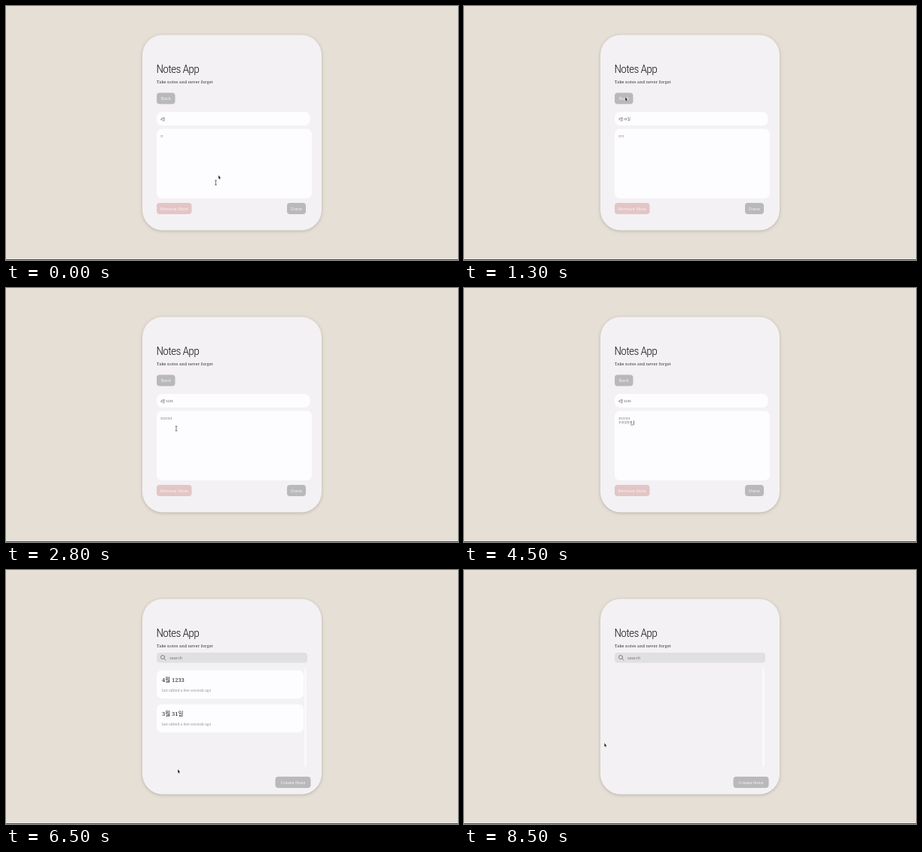
An HTML page that plays this animation: 600 px wide and 338 px high, repeating every 9.4 s.

```html
<!DOCTYPE html>
<html lang="en">
<head>
<meta charset="utf-8">
<title>Notes App</title>
<style>
  html, body { margin: 0; width: 100%; height: 100%; overflow: hidden; background: #e6dfd5; }
  svg { display: block; width: 600px; height: 338px; }
  text { font-family: "Noto Sans", sans-serif; white-space: pre; }
  .heading { font: 300 15.5px "Roboto Condensed", Roboto, sans-serif; font-stretch: 75%; letter-spacing: -.7px; fill: #151515; }
  .serif { font-family: "Noto Serif", "Noto Sans CJK KR", "Noto Sans CJK", serif; }
  .tagline { font-size: 5.4px; letter-spacing: .12px; fill: #333; }
  .card-title { font-size: 7.5px; fill: #161616; }
  .edited { font-size: 4.75px; fill: #999; }
  .field { font-size: 4.2px; fill: #444; }
  .body { font-size: 4px; fill: #666; }
  .search { font-size: 5.6px; fill: #77767a; }
  .button { font-size: 5.9px; fill: #f4f3f5; text-anchor: middle; }
  .panel { filter: drop-shadow(0 1px 2px rgba(70, 60, 50, .28)); }
</style>
</head>
<body>
<svg viewBox="0 0 600 338">
  <rect width="600" height="338" fill="#e6dfd5"/>
  <rect y="336" width="600" height="1" fill="#efece4"/>
  <rect y="337" width="600" height="1" fill="#4b4a45"/>
  <rect class="panel" x="181" y="38.5" width="238" height="260" rx="27" fill="#f3f1f4"/>
  <text class="heading" x="199.5" y="89">Notes App</text>
  <text class="serif tagline" x="200" y="102.6">Take notes and never forget</text>

  <g id="list">
    <rect x="200" y="110" width="200" height="13.5" rx="4" fill="#e0dfe2"/>
    <g fill="none" stroke="#77767a" stroke-width=".9" stroke-linecap="round">
      <circle cx="208" cy="116" r="2.5"/><path d="M209.9 117.9l2 2"/>
    </g>
    <text class="search" x="217" y="118.7">search</text>
    <rect x="396" y="131" width="3" height="131" fill="#f9f8fa"/>
    <rect id="thumb" x="396.5" y="135" width="2.5" height="117" rx="1.2" fill="#9d9c9f"/>
    <g id="cards"></g>
  </g>

  <g id="editor">
    <rect x="200" y="141" width="203.5" height="18" rx="7" fill="#fdfcfe"/>
    <rect x="200" y="163.5" width="206" height="92.5" rx="7" fill="#fdfcfe"/>
    <text id="title" class="serif field" x="205" y="152.2"></text>
    <text id="body" class="serif body" x="205" y="174.8"></text>
    <text id="typed" class="serif body" x="205" y="181"></text>
    <rect id="underline" y="181.8" width="4" height=".6" fill="#444"/>
    <rect id="caret" y="176.5" width=".6" height="5.5" fill="#222"/>
  </g>

  <g id="beam" fill="none" stroke="#444" stroke-width=".7">
    <path d="M-1.4 -3H1.4M-1.4 3H1.4M0 -3V3"/>
  </g>
  <path id="arrow" d="M0 -3V2.2L1 1.3 1.8 3 2.6 2.6 1.9 1H3.2Z" fill="#111" stroke="#fff" stroke-width=".3"/>
  <use id="ghost" href="#beam-shape"/>
</svg>
<script>
const LOOP = 9400, STEP = 100;
const TYPED = "우이앙아애앙";
const NOTES = {
  draft: ["4월", "ㅁ"],
  first: ["2021.3월.1", "ㅁㅁㄴ ㅁㅁㅁㅁㄴㅁㅁ"],
  second: ["4월 1233", "3321321"],
  third: ["3월 31일", "ㅁㅁ"]
};
const ORDER = ["first", "second", "third"];

// [start, open note or null for the list, notes already removed]
const VIEWS = [
  [0, "draft", 0], [400, null, 0], [900, "third", 0], [1400, null, 0],
  [1800, "second", 0], [2300, null, 0], [2800, "second", 0], [4900, null, 0],
  [5500, "first", 0], [6500, null, 1], [7000, "second", 1], [7500, null, 2],
  [7700, "third", 2], [7900, null, 3]
];

// [time, x, y, shape from here on]
const POINTER = [
  [0, 282, 228, "arrow"], [100, 282, 228, "arrow"], [300, 230, 266, "arrow"],
  [600, 230, 266, "arrow"], [800, 238, 252, "beam"], [1000, 238, 235, "beam"],
  [1300, 214, 124, "arrow"], [1400, 214, 124, "arrow"], [1600, 241, 205, "beam"],
  [1700, 241, 205, "beam"], [1800, 241, 211, "beam"], [1900, 241, 211, "beam"],
  [2200, 214, 124, "arrow"], [2400, 214, 124, "arrow"], [2700, 226, 187, "beam"],
  [2900, 226, 187, "beam"], [3200, 245, 170, "beam"], [3400, 245, 170, "none"],
  [4600, 245, 175, "beam"], [4800, 375, 275, "arrow"], [5000, 375, 275, "arrow"],
  [5400, 330, 142, "beam"], [5700, 328, 142, "beam"], [5800, 310, 160, "beam"],
  [6200, 228, 268, "arrow"], [6700, 228, 268, "arrow"], [7000, 254, 155, "beam"],
  [7100, 254, 155, "beam"], [7300, 228, 268, "arrow"], [7500, 228, 268, "arrow"],
  [7600, 250, 155, "beam"], [7700, 250, 155, "beam"], [7900, 227, 265, "arrow"],
  [8300, 227, 265, "arrow"], [8500, 186.3, 233, "arrow"], [LOOP, 186.3, 233, "arrow"]
];

const $ = id => document.getElementById(id);

function add(parent, tag, attrs, content = "") {
  const node = document.createElementNS("http://www.w3.org/2000/svg", tag);
  for (const key in attrs) node.setAttribute(key, attrs[key]);
  node.textContent = content;
  return parent.appendChild(node);
}

function addButton(parent, label, x, y, width, fill = "#b9b8ba") {
  add(parent, "rect", { x, y, width, height: 15, rx: 4, fill });
  add(parent, "text", { class: "button", x: x + width / 2, y: y + 9.7 }, label);
}

addButton($("list"), "Create Note", 357.5, 275, 47);
addButton($("editor"), "Back", 200, 115.5, 24.5);
addButton($("editor"), "Remove Note", 200, 262, 46.5, "#e4c5c5");
addButton($("editor"), "Done", 373, 262, 25);

const cards = ORDER.map(name => {
  const card = add($("cards"), "g", {});
  add(card, "rect", { x: 200, y: 133.5, width: 195, height: 37.5, rx: 7, fill: "#fdfcfe" });
  add(card, "text", { class: "serif card-title", x: 207, y: 149.2 }, NOTES[name][0]);
  add(card, "text", { class: "serif edited", x: 207, y: 162 }, "last edited a few seconds ago");
  return card;
});

const ghost = $("beam").cloneNode(true);
$("ghost").replaceWith(ghost);
ghost.id = "ghost";

const show = (node, visible) => node.setAttribute("visibility", visible ? "visible" : "hidden");
const place = (node, x, y) => node.setAttribute("transform", `translate(${x} ${y})`);
const setText = (id, value) => { if ($(id).textContent !== value) $(id).textContent = value; };
const display = (node, visible) => { node.style.display = visible ? "" : "none"; };

function drawPointer(t) {
  const i = POINTER.findLastIndex(key => key[0] <= t);
  const [t0, x0, y0, shape] = POINTER[i];
  const [t1, x1, y1] = POINTER[i + 1];
  const p = (t - t0) / (t1 - t0);
  for (const name of ["arrow", "beam"]) {
    place($(name), x0 + (x1 - x0) * p, y0 + (y1 - y0) * p);
    show($(name), shape === name);
  }
  place(ghost, 278.5, 235);
  show(ghost, t < 200);
}

function drawTyping(t, open) {
  const editing = open === "second";
  const count = t < 3900 ? 0 : Math.min(TYPED.length, Math.floor((t - 3900) / 130) + 1);
  setText("typed", editing ? TYPED.slice(0, count) : "");
  const end = 205 + count * 4;
  $("caret").setAttribute("x", end);
  $("underline").setAttribute("x", end - 4);
  display($("caret"), editing && t >= 3400 && t < 4700 && (t < 3700 || t >= 3900));
  display($("underline"), editing && t >= 3900 && t < 4600);
}

function draw(t) {
  const [, open, removed] = VIEWS.findLast(view => view[0] <= t);
  display($("list"), !open);
  display($("editor"), open);
  display($("thumb"), removed === 0);
  cards.forEach((card, i) => {
    display(card, i >= removed);
    place(card, 0, (i - removed) * 45.2);
  });
  if (open) {
    setText("title", NOTES[open][0]);
    setText("body", NOTES[open][1]);
  }
  drawTyping(t, open);
  drawPointer(t);
}

const start = performance.now();
function tick() {
  const t = (performance.now() - start) % LOOP;
  draw(Math.floor(t / STEP) * STEP);
  requestAnimationFrame(tick);
}
tick();
</script>
</body>
</html>
```
